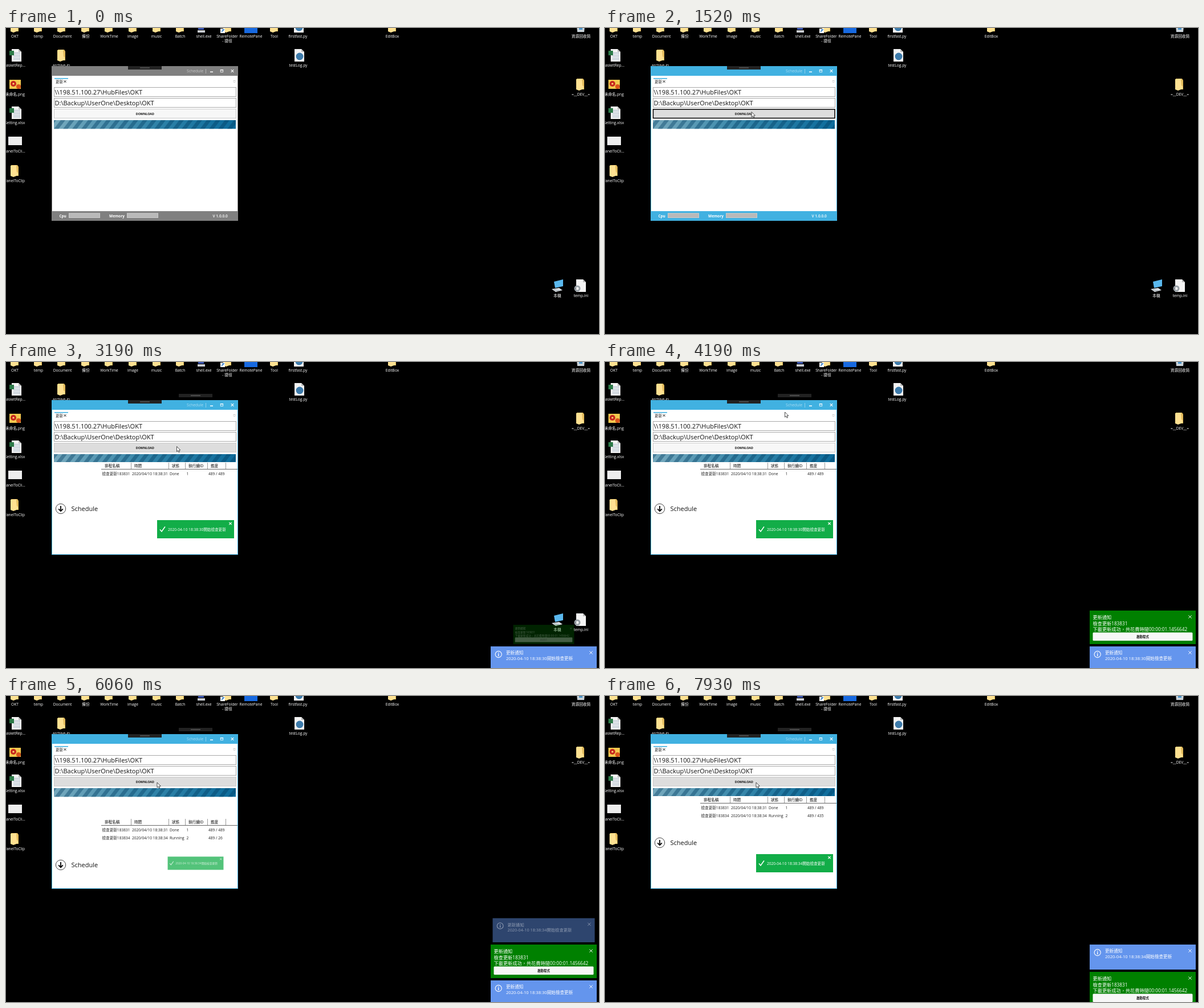
An HTML page with a canvas for the animation above (8000 ms loop, 1040 by 538 pixels).

```html
<!DOCTYPE html>
<html lang="zh-Hant">
<head>
<meta charset="utf-8">
<title>Schedule</title>
<style>
html, body { margin: 0; width: 100%; height: 100%; overflow: hidden; background: #000; }
canvas { display: block; }
</style>
</head>
<body>
<canvas id="stage" width="1040" height="538"></canvas>
<script>
const ctx = document.getElementById('stage').getContext('2d');
const LOOP = 8000;
const FONT = '"Open Sans", "Noto Sans CJK TC", "Noto Sans CJK", "Noto Sans CJK JP", sans-serif';
const ACCENT = '#41b1e1';

// Moments of the story, in ms
const ACTIVE = 1440, SHIFT = 6680;
const FLYOUT = [{ open: 1740, close: 5060 }, { open: 5904, close: Infinity }];
const TOASTS = [
  { start: 1760, end: 4800, time: '18:38:30' },
  { start: 5916, end: Infinity, time: '18:38:34' }
];
const PRESSES = [[1440, 1780], [5720, 5940]];
const PATH = [
  [100, 905, 506], [420, 421, 302], [640, 230, 150], [820, 211, 115], [1000, 211, 115],
  [1200, 259, 200], [1400, 257, 147.5], [2000, 257, 147.5], [2400, 299.5, 148.5],
  [3500, 299.5, 148.5], [3900, 315.5, 88], [4450, 315.5, 88], [4950, 97, 254],
  [5200, 97, 254], [5350, 137, 225], [5650, 265, 152], [LOOP, 265, 152]
];

const clamp = v => Math.max(0, Math.min(1, v));
const part = (t, start, length) => clamp((t - start) / length);
const mix = (a, b, p) => a + (b - a) * p;

function rect(x, y, w, h, color) {
  ctx.fillStyle = color;
  ctx.fillRect(x, y, w, h);
}

function frame(x, y, w, h, color, width = 1) {
  ctx.strokeStyle = color;
  ctx.lineWidth = width;
  ctx.strokeRect(x, y, w, h);
}

function line(points, color, width = 1) {
  ctx.beginPath();
  points.forEach(([x, y]) => ctx.lineTo(x, y));
  ctx.strokeStyle = color;
  ctx.lineWidth = width;
  ctx.stroke();
}

function shape(points, color) {
  ctx.beginPath();
  points.forEach(([x, y]) => ctx.lineTo(x, y));
  ctx.closePath();
  ctx.fillStyle = color;
  ctx.fill();
}

function disc(x, y, r, color) {
  ctx.beginPath();
  ctx.arc(x, y, r, 0, Math.PI * 2);
  ctx.fillStyle = color;
  ctx.fill();
}

function ring(x, y, r, color, width = 1) {
  ctx.beginPath();
  ctx.arc(x, y, r, 0, Math.PI * 2);
  ctx.strokeStyle = color;
  ctx.lineWidth = width;
  ctx.stroke();
}

// y is the middle of the capitals
function text(s, x, y, size, color = '#fff', weight = 400, align = 'left') {
  ctx.font = `${weight} ${size}px ${FONT}`;
  ctx.textAlign = align;
  ctx.fillStyle = color;
  ctx.fillText(s, x, y + size * 0.36);
}

function cross(x, y, r, color, width = 1) {
  line([[x - r, y - r], [x + r, y + r]], color, width);
  line([[x - r, y + r], [x + r, y - r]], color, width);
}

function zoomed(x, y, scale, alpha, draw) {
  if (scale <= 0 || alpha <= 0) return;
  ctx.save();
  ctx.globalAlpha = alpha;
  ctx.translate(x, y);
  ctx.scale(scale, scale);
  ctx.translate(-x, -y);
  draw();
  ctx.restore();
}

// Desktop icons, drawn around their centre
const icons = {
  folder(x, y) {
    shape([[x - 6, y - 10], [x + 5, y - 10], [x + 7, y - 7], [x + 7, y + 9], [x - 6, y + 9]], '#e3bb5c');
    shape([[x - 7, y - 9], [x + 3, y - 10], [x + 4, y + 2], [x + 6, y + 4], [x + 6, y + 8], [x - 2, y + 11], [x - 7, y + 9]], '#ffe191');
  },
  page(x, y) {
    shape([[x - 8, y - 11], [x + 4, y - 11], [x + 9, y - 6], [x + 9, y + 11], [x - 8, y + 11]], '#f4f4f4');
    shape([[x + 4, y - 11], [x + 4, y - 6], [x + 9, y - 6]], '#bbb');
  },
  sheet(x, y) {
    icons.page(x + 2, y);
    for (let i = 0; i < 6; i++) rect(x - 3, y - 5 + i * 2.5, 12, 0.8, '#9db0c4');
    rect(x - 10, y - 8, 8, 8, '#2c7a48');
  },
  script(x, y) {
    icons.page(x, y);
    disc(x + 1, y + 2, 6.5, '#3d7bab');
  },
  shortcut(x, y) {
    icons.folder(x, y);
    rect(x - 12, y + 4, 8, 8, '#fff');
    line([[x - 10, y + 10], [x - 6, y + 6], [x - 9, y + 6]], '#2878c8', 1.4);
  },
  blue(x, y) { rect(x - 12, y - 12, 23, 24, '#1769e0'); },
  terminal(x, y) {
    rect(x - 6, y - 8, 10, 14, '#3a55b0');
    rect(x - 7, y + 7, 13, 4, '#c9ccd2');
  },
  bin(x, y) {
    shape([[x - 8, y - 10], [x + 8, y - 10], [x + 6, y + 10], [x - 6, y + 10]], '#c9d2d8');
    rect(x - 3, y + 2, 6, 4, '#4b93c8');
  },
  picture(x, y) {
    rect(x - 10, y - 8, 20, 16, '#f3c94f');
    disc(x - 3, y - 1, 5, '#c8281e');
    disc(x + 6, y + 4, 4, '#d8541c');
    disc(x - 3, y - 1, 1.6, '#ffe27a');
  },
  square(x, y) { rect(x - 11, y - 8, 24, 15, '#ededed'); },
  computer(x, y) {
    shape([[x - 6, y - 7], [x + 10, y - 11], [x + 10, y + 1], [x - 4, y + 4]], '#5ab8ee');
    shape([[x - 10, y + 6], [x + 3, y + 4], [x + 9, y + 8], [x - 3, y + 11]], '#d9dee2');
    line([[x - 6, y + 7], [x + 3, y + 9]], '#8b979f');
  },
  config(x, y) {
    icons.page(x, y);
    ring(x - 6, y + 5, 4, '#9aa2a8', 3);
  }
};

// kind, icon x, icon y, label, label x
const DESKTOP = [
  ['folder', 15, -3, 'OKT', 15.5], ['folder', 56, -3, 'temp', 57], ['folder', 97, -3, 'Document', 99],
  ['folder', 139, -3, '備份', 140], ['folder', 180, -3, 'WorkTime', 181], ['folder', 222, -3, 'image', 222.5],
  ['folder', 264, -3, 'music', 264], ['folder', 305, -3, 'Batch', 305.5], ['terminal', 343, -3, 'shell.exe', 347],
  ['shortcut', 388, -3, 'ShareFolder', 388], ['blue', 430, -3, 'RemotePane', 429.5], ['folder', 470, -3, 'Tool', 470.5],
  ['script', 513, -3, 'firstfast.py', 512], ['folder', 677, -3, 'EditBox', 677.5], ['bin', 1008, -3, '資源回收筒', 1008.5],
  ['sheet', 16, 48, 'BasketRep...', 15], ['folder', 97, 48, 'archive-in', 97], ['script', 514, 48, 'testLog.py', 512.5],
  ['picture', 16, 99, '未命名.png', 16], ['folder', 1007, 99, '=__DEV__=', 1008],
  ['sheet', 16, 149, 'Setting.xlsx', 15.5], ['square', 15, 199, 'PanelToCli...', 15],
  ['folder', 15, 251, 'PanelToClip', 15], ['computer', 967, 453, '本機', 967], ['config', 1008, 453, 'temp.ini', 1008.5]
];

function drawDesktop() {
  rect(0, 0, 1040, 538, '#000');
  for (const [kind, x, y, label, lx] of DESKTOP) {
    icons[kind](x, y);
    text(label, lx, y + 18, 6.7, '#fff', 400, 'center');
  }
  text('- 捷徑', 388, 23, 6.7, '#fff', 400, 'center');
}

function drawFlag(x, y) {
  rect(x, y, 59, 6, '#222');
  rect(x + 21, y + 2.5, 17, 1, '#777');
}

function drawStripes(t) {
  const x = 84, y = 162, w = 319, h = 15.5, period = 16, lean = 12;
  ctx.save();
  ctx.beginPath();
  ctx.rect(x, y, w, h);
  ctx.clip();
  const fill = ctx.createLinearGradient(x, 0, x + w, 0);
  fill.addColorStop(0, '#76a9bd');
  fill.addColorStop(0.55, '#3083a8');
  fill.addColorStop(1, '#0d6c9c');
  rect(x, y, w, h, fill);
  const shift = (t / 1000 % 1) * period;
  for (let sx = x - 2 * period + shift; sx < x + w; sx += period) {
    shape([[sx, y + h], [sx + period / 2, y + h], [sx + period / 2 + lean, y], [sx + lean, y]], 'rgba(0,62,98,.4)');
  }
  ctx.restore();
}

function drawField(y, value, hover) {
  rect(84, y, 320, 17, '#fff');
  frame(84.5, y + 0.5, 319, 16, hover ? '#555' : '#a9a9a9');
  text(value, 85.5, y + 9, 11, '#111');
}

function drawWindow(t, pointer) {
  const color = t >= ACTIVE ? ACCENT : '#808080';
  const inside = (y, h) => pointer && pointer.x > 84 && pointer.x < 403 && pointer.y > y && pointer.y < y + h;
  rect(80, 67, 327, 272, color);
  rect(81, 84, 325, 238, '#fff');
  drawFlag(214, 67);
  text('Schedule', 317, 76, 6.85, 'rgba(255,255,255,.55)');
  rect(350, 72, 1, 8, 'rgba(255,255,255,.4)');
  rect(358, 76.5, 5, 1.5, '#fff');
  frame(376.2, 73.5, 4.5, 4, '#fff', 0.8);
  rect(376, 73, 5, 1.5, '#fff');
  cross(397, 75.5, 2.3, '#fff', 1.1);

  rect(85, 88, 24, 1.6, ACCENT);
  text('更新', 87, 94.3, 6.5, '#222');
  cross(103.5, 94, 2, '#222', 1);
  rect(398.5, 92, 4, 0.7, '#aaa');
  line([[398.5, 94], [400.5, 96], [402.5, 94]], '#aaa', 0.7);

  drawField(104, '\\\\198.51.100.27\\HubFiles\\OKT', inside(104, 17));
  drawField(123, 'D:\\Backup\\UserOne\\Desktop\\OKT', inside(123, 17));

  const pressed = PRESSES.some(([a, b]) => t >= a && t < b);
  rect(84, 142, 320, 17, inside(142, 17) ? '#ddd' : '#f7f7f7');
  if (pressed) frame(84.5, 143, 318.5, 15.5, '#000', 1.5);
  else frame(84.5, 142.5, 319, 16, '#ccc');
  text('DOWNLOAD', 243.8, 151, 5.3, '#111', 700, 'center');
  drawStripes(t);

  rect(80, 322, 327, 17, color);
  text('Cpu', 93.5, 330.5, 6.4, '#fff', 700);
  text('Memory', 181, 330.5, 6.5, '#fff', 700);
  text('V 1.0.0.0', 362.5, 330.5, 6.6, '#fff', 600);
  for (const x of [110, 212]) {
    rect(x, 325.5, 55, 8.5, '#b9b9b9');
    frame(x + 0.4, 325.9, 54.2, 7.7, '#cfcfcf', 0.8);
  }
}

function drawRow(y, id, index, done, count) {
  const put = (s, x) => text(s, x, y, 6.6, '#222');
  put('檢查更新1838' + id, 168.5);
  put('2020/04/10 18:38:' + id, 221);
  put(done ? 'Done' : 'Running', 287);
  put(index, 316.5);
  put('489 / ' + Math.round(count), 355);
}

function drawFlyout(t) {
  const run = FLYOUT.find(f => t >= f.open && t < f.close + 850);
  if (!run) return;
  const closing = t >= run.close;
  const left = (1 - part(t, closing ? run.close : run.open, 850)) ** 7;
  const dy = 163 * (closing ? 1 - left : left);

  ctx.save();
  ctx.beginPath();
  ctx.rect(81, 162, 325, 176);
  ctx.clip();
  ctx.translate(0, dy);
  rect(81, 176, 325, 163, '#fff');
  [['排程名稱', 173], ['時間', 225], ['狀態', 291], ['執行續ID', 320], ['進度', 359]]
    .forEach(([s, x]) => text(s, x, 182.3, 6.6, '#000'));
  [219, 285, 314, 353, 385].forEach(x => rect(x, 177, 1, 11, '#999'));
  rect(167, 188, 239, 1, '#666');

  if (t >= 1880) {
    const p = part(t, 1880, 1150);
    drawRow(197, '31', '1', p === 1, 489 * p);
  }
  if (t >= 5945) {
    const count = t < 6750 ? mix(26, 181, (t - 6060) / 690) : mix(181, 435, (t - 6750) / 1180);
    drawRow(210.7, '34', '2', false, Math.max(0, count));
  }

  ring(96, 258, 8.7, '#444', 1);
  line([[96, 253], [96, 262]], '#000', 1.8);
  line([[92.2, 258.3], [96, 262.3], [99.8, 258.3]], '#000', 1.8);
  text('Schedule', 114.5, 257.8, 11, '#111');
  ctx.restore();
}

function drawToast(t) {
  const toast = TOASTS.find(n => t >= n.start && t < n.end);
  if (!toast) return;
  drawFlag(303, 56);
  const p = Math.min(part(t, toast.start, 200), part(toast.end, t, 200));
  zoomed(332.5, 294, p, p, () => {
    rect(265, 278, 135, 32, '#12ad48');
    line([[270, 294.5], [273, 298], [279, 289.5]], '#fff', 1.5);
    text(`2020-04-10 ${toast.time}開始檢查更新`, 284, 294.3, 6.6, '#fff', 500);
    cross(393.5, 284, 2.2, '#fff', 1.2);
  });
}

// Cards grow from the bottom centre while they fade in
function drawCard(t, start, y, h, color, fill) {
  zoomed(943, y + h, part(t, start, 240), part(t, start, 500), () => {
    rect(850, y, 186, h, color);
    cross(1026, y + 11, 2.7, '#fff', 0.9);
    fill();
  });
}

function drawInfo(t, start, y, time) {
  drawCard(t, start, y, 44, '#6495ed', () => {
    ring(863.7, y + 14, 5.6, '#fff', 1.1);
    rect(863, y + 10.8, 1.4, 1.4, '#fff');
    rect(863, y + 13.2, 1.4, 4, '#fff');
    text('更新通知', 877, y + 11.7, 7.6);
    text(`2020-04-10 ${time}開始檢查更新`, 877, y + 21.5, 7.6);
  });
}

function drawResult(t, start, y) {
  drawCard(t, start, y, 59, '#008000', () => {
    text('更新通知', 855.5, y + 11.6, 8.2);
    text('檢查更新183831', 855.5, y + 22.6, 8.2);
    text('下載更新成功，共花費時間00:00:01.1456642', 855.5, y + 33.2, 8.2);
    ctx.beginPath();
    ctx.roundRect(855.5, y + 38.5, 175, 14.5, 1.5);
    ctx.fillStyle = '#f7f7f7';
    ctx.fill();
    text('啟動程式', 943, y + 46.2, 5.4, '#111', 700, 'center');
  });
}

function drawCards(t) {
  const drop = t >= SHIFT ? 48 : 0;
  if (t >= 1560 && t < SHIFT) drawInfo(t, 1450, 500, '18:38:30');
  drawResult(t, 3053, 437 + drop);
  drawInfo(t, 5830, 389 + drop, '18:38:34');
}

function pointerAt(t) {
  if (t < PATH[0][0]) return null;
  const i = PATH.findIndex(k => k[0] > t);
  const [t0, x0, y0] = PATH[i - 1], [t1, x1, y1] = PATH[i];
  const p = (t - t0) / (t1 - t0), e = p * p * (3 - 2 * p);
  return { x: mix(x0, x1, e), y: mix(y0, y1, e) };
}

function drawPointer({ x, y }) {
  const overField = x > 84 && x < 403 && y > 104 && y < 140;
  if (overField) {
    line([[x, y], [x, y + 9]], '#333', 0.9);
    line([[x - 2, y], [x + 2, y]], '#333', 0.9);
    line([[x - 2, y + 9], [x + 2, y + 9]], '#333', 0.9);
    return;
  }
  const outline = [[0, 0], [0, 9], [2, 7.2], [3.5, 10.3], [5, 9.6], [3.6, 6.6], [6.3, 6.4], [0, 0]]
    .map(([dx, dy]) => [x + dx, y + dy]);
  shape(outline, '#fff');
  line(outline, '#222', 0.8);
}

function draw(t) {
  const pointer = pointerAt(t);
  drawDesktop();
  drawWindow(t, pointer);
  drawFlyout(t);
  drawToast(t);
  drawCards(t);
  if (pointer) drawPointer(pointer);
}

const begin = performance.now();
function tick() {
  draw((performance.now() - begin) % LOOP);
  requestAnimationFrame(tick);
}
tick();
</script>
</body>
</html>
```
